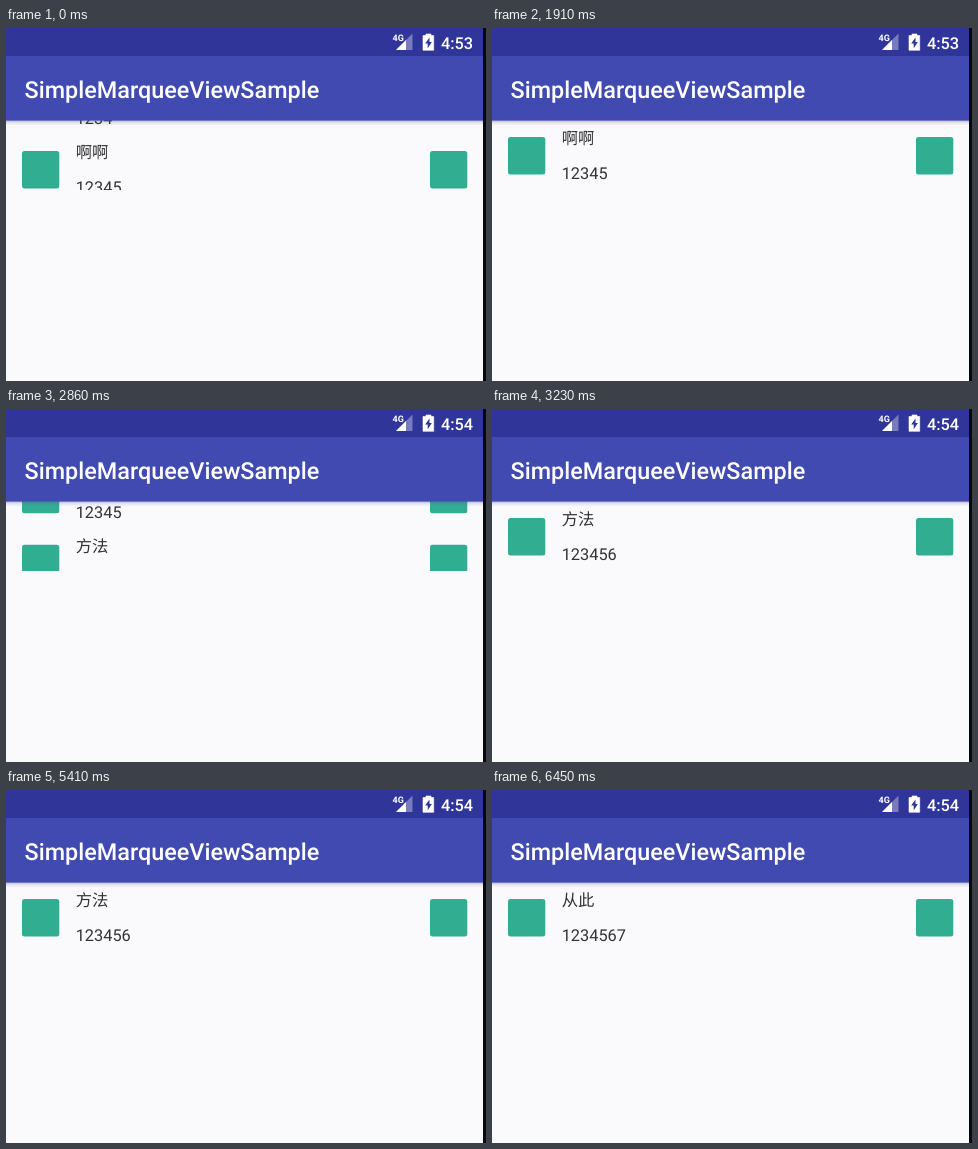
Write an HTML page that moves like this. It is 480 px wide and 353 px high and loops after 6.49 s.

```html
<!DOCTYPE html>
<html lang="zh-CN">
<head>
<meta charset="utf-8">
<title>SimpleMarqueeViewSample</title>
<style>
  html, body { margin: 0; width: 100%; height: 100%; overflow: hidden; background: #faf9fc; }
  svg { display: block; width: 480px; height: 353px; }
  text { font-family: Roboto, "Noto Sans CJK SC", "Noto Sans CJK", sans-serif; text-rendering: geometricPrecision; }
  .row { font-size: 16.35px; fill: #333337; }
  .bar { font-weight: 500; fill: #fff; }
</style>
</head>
<body>
<svg viewBox="0 0 480 353">
  <defs>
    <clipPath id="window"><rect x="0" y="92" width="478" height="70"/></clipPath>
    <linearGradient id="shade" x1="0" y1="0" x2="0" y2="1">
      <stop offset="0" stop-color="#50558f" stop-opacity=".36"/>
      <stop offset=".4" stop-color="#50558f" stop-opacity=".13"/>
      <stop offset="1" stop-color="#50558f" stop-opacity="0"/>
    </linearGradient>
  </defs>

  <rect width="480" height="353" fill="#faf9fc"/>
  <g clip-path="url(#window)"><g id="strip"></g></g>

  <rect y="92.700" width="478" height="5" fill="url(#shade)"/>
  <rect y="28" width="478" height="64.700" fill="#414ab1"/>
  <rect width="478" height="28" fill="#30359a"/>
  <text class="bar" x="18.600" y="69.500" font-size="23.400">SimpleMarqueeViewSample</text>

  <path d="M390 22H406.500V5.500Z" fill="#fff" opacity=".35"/>
  <path d="M390 22H400V12Z" fill="#fff"/>
  <rect x="386" y="4" width="12" height="9" fill="#30359a"/>
  <text class="bar" x="386.500" y="12.800" font-size="9" style="font-weight:700">4G</text>
  <path d="M420 7.500V6H425V7.500H427.700V22.300H417V7.500Z" fill="#fff" stroke="#fff" stroke-width=".6" stroke-linejoin="round"/>
  <path d="M423.500 9.500L419.200 15.500H421.700V20.200L425.900 14H423.500Z" fill="#30359a"/>
  <text class="bar" id="clock" x="434.900" y="20.700" font-size="16.350"></text>

  <rect x="477" width="3" height="353" fill="#08080c"/>
</svg>
<script>
const LOOP = 6490, SLIDE = 800, CLOCK_TICK = 2400;
const TOP = 93, ROW_HEIGHT = 69;
const slideStarts = [-562, 2404, 5404];
const rows = [['', '1234'], ['啊啊', '12345'], ['方法', '123456'], ['从此', '1234567']];

const strip = document.getElementById('strip');
const clock = document.getElementById('clock');

const icon = x => `<rect x="${x}" y="16" width="37.300" height="37.500" rx="2.500" fill="#31ad92"/>`;
const line = (y, label) => `<text class="row" x="69.700" y="${y}">${label}</text>`;

strip.innerHTML = rows.map(([upper, lower], i) =>
  `<g transform="translate(0 ${i * ROW_HEIGHT})">
    ${icon(16)}${icon(424)}${line(23.2, upper)}${line(57.8, lower)}
  </g>`).join('');

// Accelerate, then decelerate.
function ease(p) {
  const c = Math.min(1, Math.max(0, p));
  return (1 - Math.cos(Math.PI * c)) / 2;
}

function render(t) {
  const position = slideStarts.reduce((sum, start) => sum + ease((t - start) / SLIDE), 0);
  strip.setAttribute('transform', `translate(0 ${TOP - position * ROW_HEIGHT})`);
  clock.textContent = t < CLOCK_TICK ? '4:53' : '4:54';
}

const begin = performance.now();
function tick() {
  render((performance.now() - begin) % LOOP);
  requestAnimationFrame(tick);
}
render(0);
requestAnimationFrame(tick);
</script>
</body>
</html>
```
